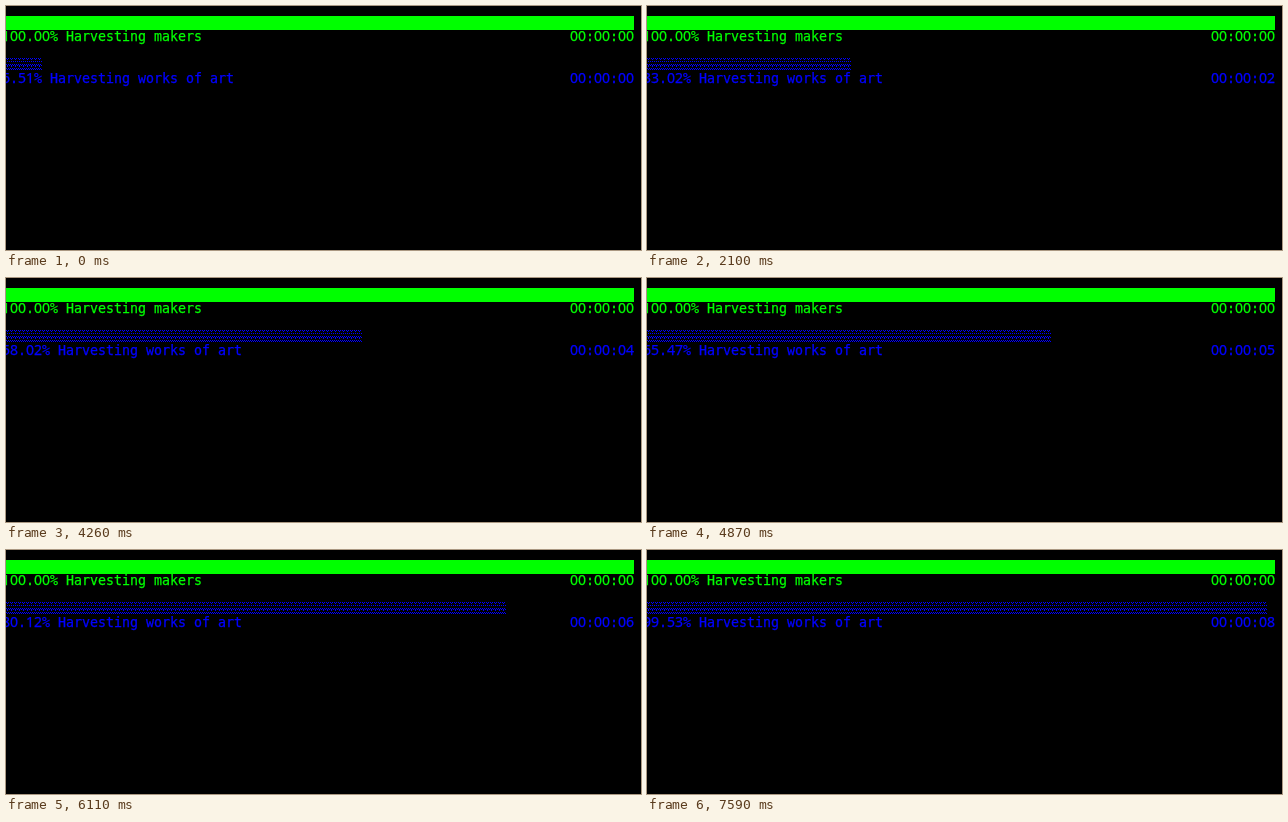
Recreate the animation shown at these times as an HTML page with a canvas. Size 635x244 px, loop 8 s.

```html
<!DOCTYPE html>
<html lang="en">
<head>
<meta charset="utf-8">
<title>Harvest progress</title>
<style>
  html, body { margin: 0; width: 100%; height: 100%; overflow: hidden; background: #000; }
  canvas { display: block; }
</style>
</head>
<body>
<canvas id="stage" width="635" height="244"></canvas>
<script>
const ctx = document.getElementById('stage').getContext('2d');
const LOOP = 8000, TOTAL = 860;
const CELL = 8, ROW = 14, LEFT = -4, TOP = 10, COLS = 79;
const GREEN = '#00ff00', BLUE = '#0000ff';

// Bursts of eight updates: first and last time of each, in ms.
const bursts = [[120, 1050], [1170, 2100], [2220, 3150], [3300, 4260],
  [4420, 5410], [5560, 6540], [6690, 7590]];
const times = [0];
for (const [from, to] of bursts)
  for (let i = 0; i < 8; i++)
    times.push(Math.floor((from + (to - from) * i / 7) / 10) * 10);

// Items harvested after a given number of updates.
const knots = [[0, 56], [16, 284], [25, 404], [32, 499], [41, 644], [50, 778], [56, 856]];

function itemsAt(step) {
  const k = Math.max(1, knots.findIndex(([s]) => s >= step));
  const [s0, n0] = knots[k - 1], [s1, n1] = knots[k];
  return Math.round(n0 + (n1 - n0) * (step - s0) / (s1 - s0));
}

// Terminal text: one glyph per cell, with plain zeros and a firm stroke.
function write(text, col, row, color) {
  ctx.fillStyle = ctx.strokeStyle = color;
  ctx.lineWidth = 0.25;
  ctx.textAlign = 'center';
  ctx.textBaseline = 'alphabetic';
  [...text].forEach((ch, i) => {
    ctx.font = /\d/.test(ch)
      ? '14px "Noto Sans", sans-serif'
      : '13.3px "DejaVu Sans Mono", monospace';
    const x = LEFT + (col + i + 0.5) * CELL, y = TOP + row * ROW + 11;
    ctx.fillText(ch, x, y);
    ctx.strokeText(ch, x, y);
  });
}

function status(row, done, seconds, label, color) {
  write((done * 100).toFixed(2) + '% ' + label, 0, row, color);
  write('00:00:' + String(seconds).padStart(2, '0'), COLS - 8, row, color);
}

// One shaded cell: two thin dotted rules above two thicker ones.
const shade = document.createElement('canvas');
shade.width = CELL;
shade.height = ROW;
const sctx = shade.getContext('2d');
sctx.fillStyle = BLUE;
for (let y = 0; y < 12; y++) {
  const rule = [0, 3, 6, 7, 10, 11].includes(y);
  for (let x = 0; x < CELL; x++) {
    const on = rule ? (x + y) % 2 === 0 : y % 7 === 1 && x % 4 === 1;
    if (on) sctx.fillRect(x, y, 1, 1);
  }
}

function draw(t) {
  let step = times.length - 1;
  while (times[step] > t) step--;
  const done = itemsAt(step) / TOTAL;
  const seconds = Math.floor((times[step] + 550) / 1000);

  ctx.fillStyle = '#000';
  ctx.fillRect(0, 0, 635, 244);
  ctx.fillStyle = GREEN;
  ctx.fillRect(LEFT, TOP, COLS * CELL, ROW);
  status(1, 1, 0, 'Harvesting makers', GREEN);

  const filled = Math.floor(done * COLS);
  for (let i = 0; i < filled; i++)
    ctx.drawImage(shade, LEFT + i * CELL, TOP + 3 * ROW);
  status(4, done, seconds, 'Harvesting works of art', BLUE);
}

function tick() {
  draw(performance.now() % LOOP);
  requestAnimationFrame(tick);
}
tick();
</script>
</body>
</html>
```
